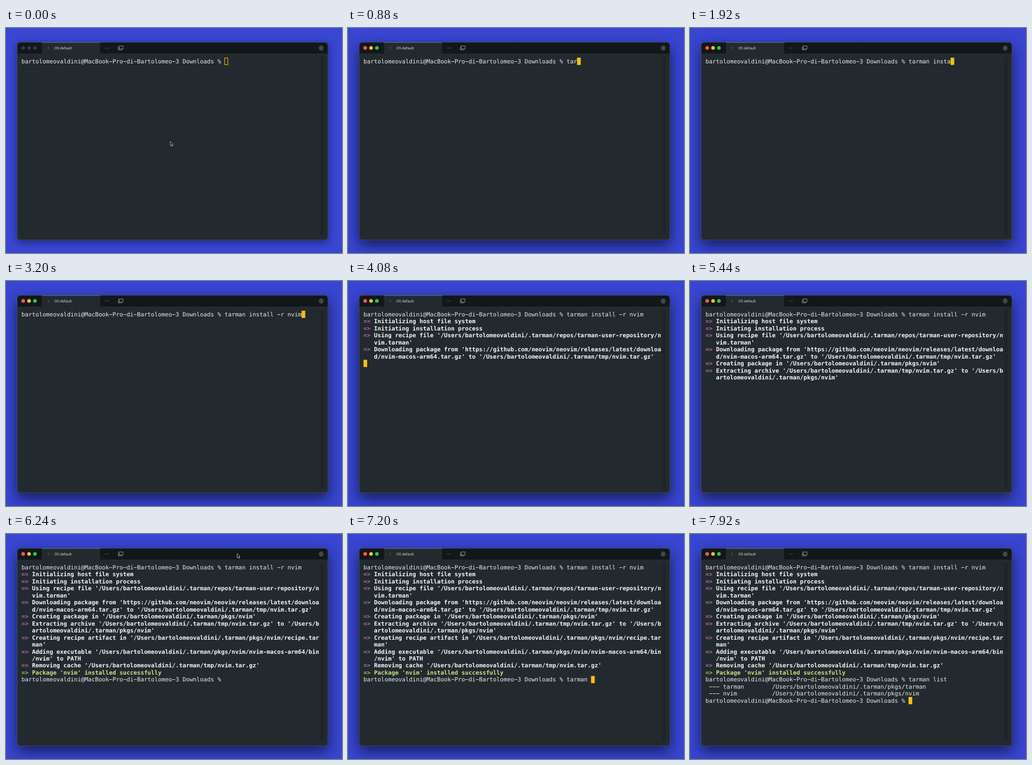
An HTML page with a canvas that plays this animation: 646x432 px, repeating every 8 s.

```html
<!DOCTYPE html>
<html lang="en">
<head>
<meta charset="utf-8">
<title>Terminal</title>
<style>
html, body { margin: 0; width: 100%; height: 100%; overflow: hidden; background: #3846d1; }
canvas { display: block; width: 646px; height: 432px; }
</style>
</head>
<body>
<canvas id="stage"></canvas>
<script>
const W = 646, H = 432, LOOP = 8000;
const canvas = document.getElementById('stage');
const ctx = canvas.getContext('2d');
const dpr = window.devicePixelRatio || 1;
canvas.width = W * dpr;
canvas.height = H * dpr;

// Terminal grid
const LEFT = 29.8, TOP = 57, CELL = 6.731, ROW = 13.47, WRAP = 82;
const MONO = '11.18px "DejaVu Sans Mono", "Liberation Mono", monospace';
const C = {
  back: '#3846d1', body: '#232a2f', bar: '#12171a', text: '#e6eaec', bold: '#f4f7f8',
  arrow: '#b565a8', done: '#c1e683', doneArrow: '#93c554', cursor: '#ffc107'
};

const USER = 'bartolomeovaldini';
const HOME = `/Users/${USER}/.tarman`;
const PROMPT = `${USER}@MacBook-Pro-di-Bartolomeo-3 Downloads % `;
const FOCUS = 240;

const install = {
  text: 'tarman install -r nvim',
  keys: [640, 760, 860, 960, 1080, 1200, 1360, 1600, 1680, 1760, 1840, 1910,
    2000, 2100, 2200, 2300, 2400, 2480, 2800, 2920, 3040, 3160]
};
const list = {
  text: 'tarman list',
  keys: [...'tarman list'].map((_, i) => 6560 + i * 98)
};
const ENTER1 = 3440, READY1 = 5520, ENTER2 = 7680, READY2 = 7760;

const steps = [
  [3520, 'Initializing host file system'],
  [3520, 'Initiating installation process'],
  [3600, `Using recipe file '${HOME}/repos/tarman-user-repository/nvim.tarman'`],
  [3600, `Downloading package from 'https://github.com/neovim/neovim/releases/latest/download/nvim-macos-arm64.tar.gz' to '${HOME}/tmp/nvim.tar.gz'`],
  [4480, `Creating package in '${HOME}/pkgs/nvim'`],
  [4480, `Extracting archive '${HOME}/tmp/nvim.tar.gz' to '${HOME}/pkgs/nvim'`],
  [READY1, `Creating recipe artifact in '${HOME}/pkgs/nvim/recipe.tarman'`],
  [READY1, `Adding executable '${HOME}/pkgs/nvim/nvim-macos-arm64/bin/nvim' to PATH`],
  [READY1, `Removing cache '${HOME}/tmp/nvim.tar.gz'`],
  [READY1, `Package 'nvim' installed successfully`, true]
];
const packages = ['tarman', 'nvim'];

// Every moment at which the cursor moves and its blink restarts
const resets = [FOCUS, ...install.keys, ENTER1, ...steps.map(s => s[0]), ...list.keys, ENTER2, READY2];

const typed = (cmd, t) => cmd.text.slice(0, cmd.keys.filter(k => k <= t).length);

function put(text, col, row, color, bold) {
  ctx.font = (bold ? 'bold ' : '') + MONO;
  ctx.fillStyle = color;
  // Plain weight shows long dashes
  const glyphs = bold ? text : text.replace(/-/g, '\u2212');
  const y = TOP + row * ROW + 10.9;
  [...glyphs].forEach((g, i) => {
    if (g !== ' ') ctx.fillText(g, LEFT + (col + i) * CELL, y);
  });
}

function drawTerminal(t) {
  let row = 0, col = 0;
  const prompt = cmd => {
    const line = PROMPT + typed(cmd, t);
    put(line, 0, row, C.text);
    col = line.length;
  };
  const newline = () => { row++; col = 0; };

  prompt(install);
  if (t >= ENTER1) newline();
  for (const [at, text, done] of steps) {
    if (t < at) break;
    put('=>', 0, row, done ? C.doneArrow : C.arrow, true);
    for (let i = 0; i < text.length; i += WRAP) {
      put(text.slice(i, i + WRAP), 3, row, done ? C.done : C.bold, true);
      newline();
    }
  }
  if (t >= READY1) prompt(list);
  if (t >= ENTER2) newline();
  if (t >= READY2) {
    for (const name of packages) {
      put(` --- ${name.padEnd(14)}${HOME}/pkgs/${name}`, 0, row, C.text);
      newline();
    }
    put(PROMPT, 0, row, C.text);
    col = PROMPT.length;
  }
  drawCursor(t, LEFT + col * CELL, TOP + row * ROW);
}

function drawCursor(t, x, y) {
  if (t < FOCUS) {
    ctx.strokeStyle = C.cursor;
    ctx.lineWidth = 1;
    ctx.strokeRect(Math.round(x) + 0.5, y + 0.5, 6, 13);
    return;
  }
  const since = t - Math.max(...resets.filter(r => r <= t));
  if (since % 1200 >= 600) return;
  ctx.fillStyle = C.cursor;
  ctx.fillRect(x, y, CELL + 0.3, ROW + 0.4);
}

function rounded(x, y, w, h, r) {
  ctx.beginPath();
  ctx.roundRect(x, y, w, h, r);
}

function line(points, close) {
  ctx.beginPath();
  points.forEach(([x, y]) => ctx.lineTo(x, y));
  if (close) ctx.closePath();
}

function drawWindow(focused) {
  ctx.fillStyle = C.back;
  ctx.fillRect(0, 0, W, H);

  ctx.save();
  ctx.shadowColor = focused ? 'rgba(0,0,20,.62)' : 'rgba(0,0,20,.48)';
  ctx.shadowBlur = (focused ? 27 : 15) * dpr;
  ctx.shadowOffsetY = (focused ? 10 : 4) * dpr;
  rounded(21.5, 27.5, 597.5, 379.5, 6);
  ctx.fillStyle = C.body;
  ctx.fill();
  ctx.restore();

  ctx.save();
  rounded(21.5, 27.5, 597.5, 379.5, 6);
  ctx.clip();
  ctx.fillStyle = C.bar;
  ctx.fillRect(21, 27, 599, 22);
  ctx.fillStyle = C.body;
  ctx.fillRect(69, 27, 112, 22);
  ctx.fillStyle = '#1e2529';
  ctx.fillRect(604, 55, 7, 342);
  ctx.restore();

  rounded(21.5, 27.5, 597.5, 379.5, 6);
  ctx.strokeStyle = '#4b5156';
  ctx.lineWidth = 0.8;
  ctx.stroke();
  ctx.fillStyle = '#59798c';
  ctx.fillRect(69, 27.3, 112, 1);
}

function drawBar(focused) {
  const lights = focused ? ['#ff5a50', '#fdbc2f', '#29c940'] : Array(3).fill('#343a3e');
  lights.forEach((color, i) => {
    ctx.fillStyle = color;
    ctx.beginPath();
    ctx.arc(33 + i * 11.3, 38.2, 3.5, 0, Math.PI * 2);
    ctx.fill();
  });

  ctx.font = '6.8px "Noto Sans", "Open Sans", sans-serif';
  ctx.fillStyle = '#7c8589';
  ctx.fillText('1', 79.5, 40.8);
  ctx.fillStyle = '#e0e4e6';
  ctx.fillText('OS default', 93, 40.8);

  ctx.fillStyle = '#454c50';
  ctx.fillRect(190, 38, 8, 1);

  // Stacked windows
  ctx.strokeStyle = '#aab0b3';
  ctx.lineWidth = 0.8;
  ctx.strokeRect(217.4, 34.5, 7.6, 5.6);
  line([[216, 36], [216, 42], [223.5, 42]]);
  ctx.stroke();

  drawGear(606, 38.5);
}

function drawGear(x, y) {
  const rim = [];
  for (let i = 0; i < 48; i++) {
    const a = i / 48 * Math.PI * 2;
    const r = 3.8 + 0.45 * Math.cos(a * 6);
    rim.push([x + r * Math.cos(a), y + r * Math.sin(a)]);
  }
  ctx.strokeStyle = '#a4aaad';
  ctx.lineWidth = 0.8;
  line(rim, true);
  ctx.stroke();
  ctx.beginPath();
  ctx.arc(x, y, 1.6, 0, Math.PI * 2);
  ctx.stroke();
}

function drawPointer(t) {
  const back = t >= 5600 && t < list.keys[0];
  if (t >= install.keys[0] && !back) return;
  const p = back ? Math.min((t - 5600) / 560, 1) : 0;
  const e = p * p * (3 - 2 * p);
  const x = 316 + 128.5 * e, y = 217.8 - 180.3 * e;
  line([[0, 0], [0, 8.2], [1.9, 6.5], [3.2, 9.3], [4.5, 8.7], [3.3, 6], [5.7, 5.8]]
    .map(([dx, dy]) => [x + dx, y + dy]), true);
  ctx.fillStyle = '#0b0d0e';
  ctx.fill();
  ctx.strokeStyle = '#e8eaeb';
  ctx.lineWidth = 0.7;
  ctx.stroke();
}

function draw(t) {
  const focused = t >= FOCUS;
  ctx.setTransform(dpr, 0, 0, dpr, 0, 0);
  ctx.textRendering = 'geometricPrecision';
  drawWindow(focused);
  drawBar(focused);
  drawTerminal(t);
  drawPointer(t);
}

const start = performance.now();
function frame() {
  draw((performance.now() - start) % LOOP);
  requestAnimationFrame(frame);
}
frame();
</script>
</body>
</html>
```
